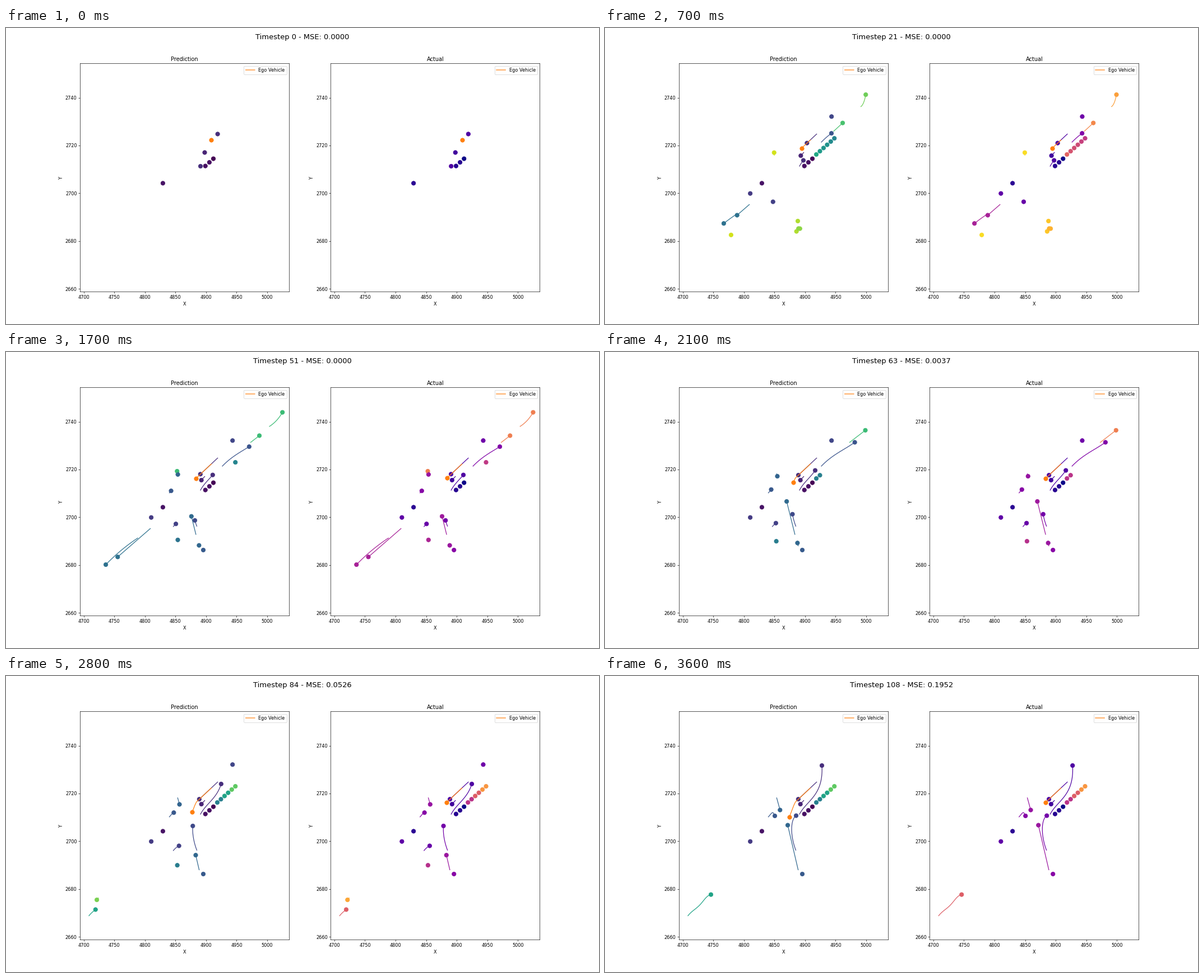
Write a matplotlib script that moves like this. It is 1058 px wide and 529 px high and loops after 3.7 s.

```python
from math import comb

import numpy as np
import matplotlib.pyplot as plt
from matplotlib.animation import FuncAnimation

FRAMES, STEP = 37, 3
LAST = FRAMES - 1
XLIM, YLIM = (4694.1, 5035.7), (2658.9, 2754.3)
LEFT, RIGHT, TOP, BOTTOM = 132.25, 504.95, 63.5, 470.8   # first panel, in pixels


def to_data(p):
    x = np.interp(p[:, 0], (LEFT, RIGHT), XLIM)
    y = np.interp(p[:, 1], (TOP, BOTTOM), YLIM[::-1])
    return np.column_stack([x, y])


class Track:
    """Bezier path driven from frame t0 to t1, then held until it leaves."""

    def __init__(self, shade, t0, t1, *points, gain=1, brake=1, until=None):
        self.shade, self.t0, self.t1 = shade, t0, t1
        self.points = np.array(points, float)
        self.gain, self.brake = gain, brake
        self.until = t1 if until is None else until

    def visible(self, k):
        return self.t0 <= k <= self.until

    def at(self, t):
        u = np.clip((t - self.t0) / (self.t1 - self.t0), 0, 1)
        s = 1 - (1 - u ** self.gain) ** self.brake
        n = len(self.points) - 1
        return sum(comb(n, i) * np.outer(s ** i * (1 - s) ** (n - i), p)
                   for i, p in enumerate(self.points))

    def times(self, k):
        return np.linspace(self.t0, k, int(np.ceil((k - self.t0) * STEP)) + 1)

    def trail(self, k):
        return to_data(self.at(self.times(k)))


class DriftTrack(Track):
    """Follows the base path, then slides away along a straight line."""

    def at(self, t):
        late = np.clip((t - 16.5) / (LAST - 16.5), 0, 1) ** 0.87
        return super().at(t) + np.outer(late, (-10, 26.4))


tracks = []


def drive(*args, **options):
    tracks.append(Track(*args, **options))


def park(shade, t0, t1, *spot):
    drive(shade, t0, t1, spot)


def row(shades, t0, t1, start, step, first=0):
    for i, shade in enumerate(shades, first):
        park(shade, t0, t1, start[0] + i * step[0], start[1] + i * step[1])


# Vehicles around the ego from the start
row((0, 0.04, 0.04), 0, LAST, (370, 233.6), (-7.15, 6.5))
park(0.05, 0, LAST, 279.9, 277.4)
drive(0.10, 0, 14, (354.5, 222.5), (348.6, 229), brake=3, until=LAST)
drive(0.13, 0, LAST, (347, 247), (360, 222), (390, 214), (387, 160), gain=1.15)
drive(0.13, 0, 22.5, (377.6, 189.5), (344.8, 220.2), brake=2, until=LAST)

# Joining in the first second
park(0.17, 1, LAST, 259.1, 295.7)
drive(0.19, 1, 31, (298.6, 312), (303, 306), (310.5, 302.6), gain=1.3)
park(0.21, 1, 31, 404.2, 158.3)
drive(0.26, 1, 23, (386, 204), (408, 181), (430, 174), (451.5, 157))
drive(0.30, 1, 4, (190, 372.5), (177.5, 385.3))
drive(0.37, 1, 19, (257.5, 315.5), (192, 372.6))
drive(0.37, 0.6, 19, (235, 332.5), (201, 355), (171.6, 386.8))
drive(0.71, 3, 8, (408, 184.5), (428, 166))
drive(0.78, 2, 8, (456.5, 140.5), (463, 136), (466.5, 111.5))
park(0.88, 3, 13, 344, 345)
park(0.88, 3, 8, 341.6, 363.5)
park(0.83, 3, 13, 345.2, 358.4)
drive(0.83, 3, 13, (349, 358.9), (346, 358))
drive(0.93, 5.7, 8, (302, 227.5), (301.5, 219))
park(0.93, 4, 13, 224.9, 369.8)

# Queue on the diagonal road, seen twice
QUEUE = dict(start=(377, 226), step=(6.45, -5.77))
row((0.60, 0.54, 0.52, 0.51, 0.48), 2, 14, **QUEUE)
row((0.45,), 2, 18, first=5, **QUEUE)
row((0.43, 0.43), 20, LAST, **QUEUE)
row((0.58, 0.58, 0.75, 0.75), 25, LAST, first=2, **QUEUE)

# Joining later
drive(0.68, 8.6, 17, (470, 133), (484, 124), (493.2, 107.8))
drive(0.68, 12, 22, (436.5, 161.5), (467.6, 137.5))
drive(0.68, 9, 18, (304.5, 216), (305.3, 213), brake=2)
drive(0.27, 10, LAST, (291.5, 251.8), (299, 243), (299, 241), (303, 250), gain=1.4)
drive(0.22, 11, LAST, (340.4, 311.3), (330, 284), (331, 256), (341, 249.6), gain=1.45)
drive(0.34, 10.2, 23, (338.8, 326), (320.5, 252.5), gain=1.3)
drive(0.33, 13, LAST, (344.6, 346.4), (326, 266.6), gain=2.6)
park(0.28, 13, LAST, 352, 353.9)
park(0.38, 13, 18, 306.5, 335.8)
park(0.42, 19, 31, 305.6, 338.2)
drive(0.32, 15, LAST, (306.3, 217.8), (312.3, 239.5), gain=1.3)
drive(0.58, 25.3, LAST, (148, 428.5), (160, 413), (172, 416), (176, 393), (189, 390.6))
drive(0.80, 27.2, 33, (165, 396.8), (143.6, 420.3))

ego_path = 0, 0, 20.5, (366.3, 200.2), (338.8, 226)
egos = [kind(*ego_path, brake=2, until=LAST) for kind in (DriftTrack, Track)]


def mse(step):
    return 0.1952 * (max(step - 53.6, 0) / 54.4) ** 2.253


fig, axes = plt.subplots(1, 2, figsize=(18, 9), dpi=58.778)
heading = fig.suptitle("", fontsize=16, y=0.981)

panels = []
for ax, name, cmap, ego in zip(axes, ("Prediction", "Actual"),
                               (plt.cm.viridis, plt.cm.plasma), egos):
    ax.set(title=name, xlabel="X", ylabel="Y", xlim=XLIM, ylim=YLIM)
    colors = [cmap(float(tr.shade)) for tr in tracks]
    lines = [ax.plot([], [], color=c)[0] for c in colors]
    dots = ax.scatter([], [], s=80)
    ego_line, = ax.plot([], [], color="tab:orange", label="Ego Vehicle")
    ego_dot = ax.scatter([], [], s=80, color="tab:orange")
    ax.legend(loc="upper right").get_lines()[0].set_snap(False)
    panels.append((colors, lines, dots, ego, ego_line, ego_dot))


def draw(k):
    step = k * STEP
    heading.set_text(f"Timestep {step} - MSE: {mse(step):.4f}")
    for colors, lines, dots, ego, ego_line, ego_dot in panels:
        spots, shades = [], []
        for tr, color, line in zip(tracks, colors, lines):
            shown = tr.visible(k)
            line.set_visible(shown)
            if shown:
                path = tr.trail(k)
                line.set_data(path.T)
                spots.append(path[-1])
                shades.append(color)
        dots.set_offsets(spots)
        dots.set_facecolor(shades)
        dots.set_edgecolor(shades)
        path = ego.trail(k)
        ego_line.set_data(path.T)
        ego_dot.set_offsets(path[-1:])
    return []


anim = FuncAnimation(fig, draw, frames=FRAMES, interval=100, repeat=True,
                     repeat_delay=0, init_func=lambda: draw(0))
plt.show()
```
